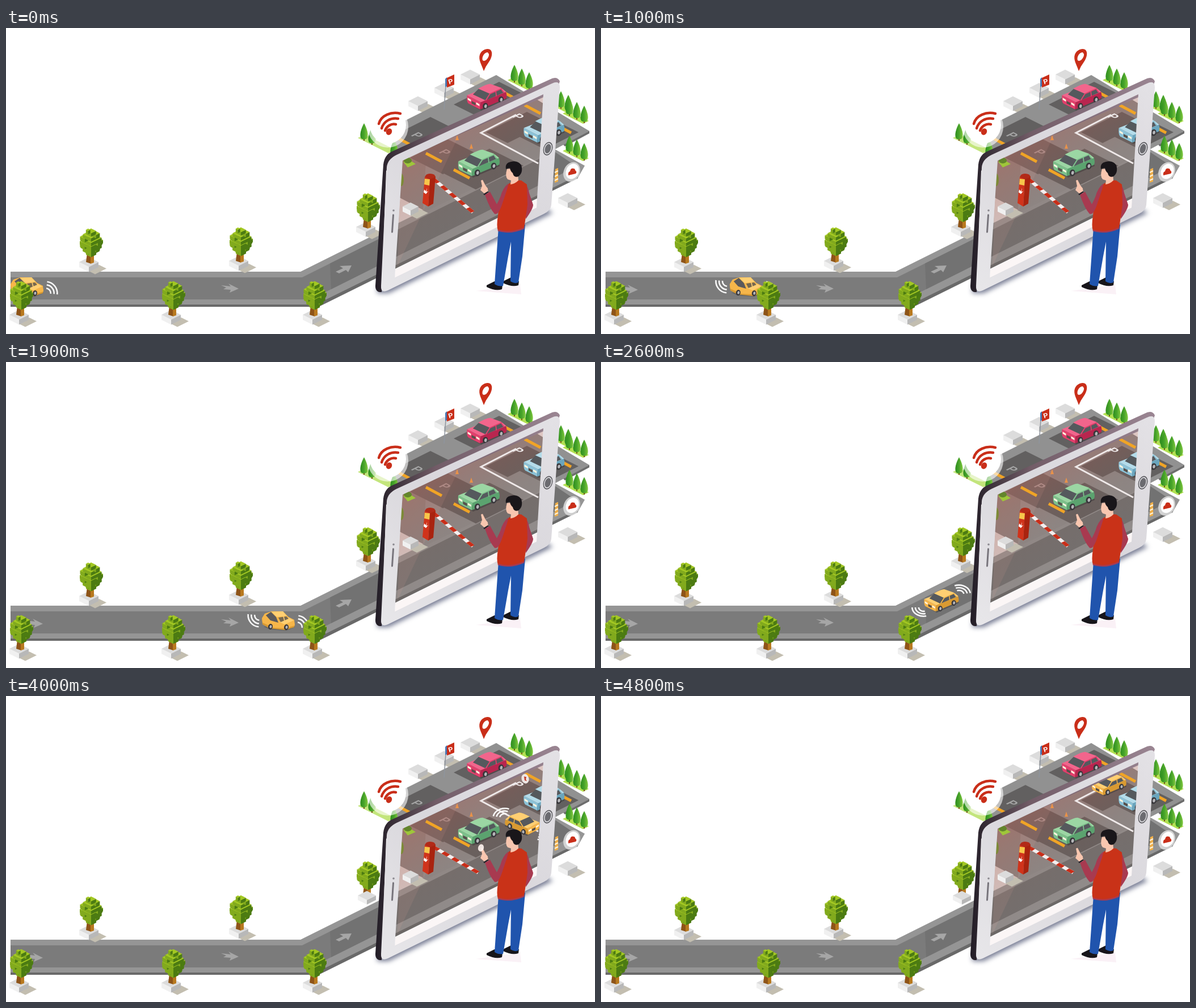
Write an HTML page with a canvas that moves like this. It is 1038 by 540 pixels and loops after 7.8 s.

```html
<!DOCTYPE html>
<html lang="en">
<head>
<meta charset="utf-8">
<title>Smart parking</title>
<style>
html, body { margin: 0; width: 100%; height: 100%; overflow: hidden; background: #fff; }
canvas { display: block; }
</style>
</head>
<body>
<canvas id="stage" width="1038" height="540"></canvas>
<script>
const c = document.getElementById('stage').getContext('2d');
const RED = '#c92e19';

// drawing helpers
const fill = (color, d, rule = 'nonzero') => { c.fillStyle = color; c.fill(new Path2D(d), rule); };
const line = (color, width, d) => { c.strokeStyle = color; c.lineWidth = width; c.stroke(new Path2D(d)); };
const oval = (color, x, y, rx, ry = rx, turn = 0) => {
  c.fillStyle = color;
  c.beginPath();
  c.ellipse(x, y, rx, ry, turn, 0, 7);
  c.fill();
};
const at = (x, y, draw, sx = 1, sy = sx, turn = 0) => {
  c.save();
  c.translate(x, y);
  c.rotate(turn);
  c.scale(sx, sy);
  draw();
  c.restore();
};
const blend = (x0, y0, x1, y1, ...colors) => {
  const g = c.createLinearGradient(x0, y0, x1, y1);
  colors.forEach((col, i) => g.addColorStop(i / (colors.length - 1), col));
  return g;
};
const letterP = (color, size) => {
  c.fillStyle = color;
  c.font = `bold ${size}px Arial, "Liberation Sans", sans-serif`;
  c.textAlign = 'center';
  c.fillText('P', 0, size * 0.37);
};

// isometric pieces: a flat tile from its left corner, a block from its top centre
const tile = (color, x, y, a, b) => fill(color, `M${x} ${y}l${a} ${-a / 2} ${b} ${b / 2} ${-a} ${a / 2}z`);
const block = (x, y, w, h, top, left, right) => {
  fill(left, `M${x - w} ${y}l${w} ${w / 2}v${h}l${-w} ${-w / 2}z`);
  fill(right, `M${x + w} ${y}l${-w} ${w / 2}v${h}l${w} ${-w / 2}z`);
  tile(top, x - w, y, w, w);
};
const stone = (x, y, w) => {
  tile('#c3beb0', x - 2, y + 15, 20, 13);
  block(x, y, w, 9, '#dcdcdc', '#f0f0f0', '#b8b8b8');
};

// straight legs between [step, a, b...] keys
function track(keys, s) {
  let i = 1;
  while (i < keys.length - 1 && keys[i][0] < s) i++;
  const [t0, ...a] = keys[i - 1], [t1, ...b] = keys[i];
  const k = Math.min(1, Math.max(0, (s - t0) / (t1 - t0)));
  return a.map((v, j) => v + (b[j] - v) * k);
}
const DRIVE = [
  [0, 37, 457], [8, 206, 457], [19, 480, 457], [20, 480, 457], [24, 544, 450],
  [38, 934, 255], [39, 930, 237], [44, 830, 186], [48, 895, 157]
];
const GATE = [[26, 0.7], [31, -0.09], [34, -0.09], [39, 0.52]];

// scenery
function road() {
  fill('#959595', 'M8 430H519L960 210 1020 243 1008 264 550 490H8Z');
  fill('#696969', 'M8 488H546L1006 261 1008 265 551 492H8Z');
  fill('#7b7b7b', 'M8 440H522L966 218 1002 242 980 257 537 479H8Z');
  fill('#727272', 'M571 415.500L966 218 1002 242 980 257 573 461Z');
  const arrow = 'M379 454L396 456 392 451 410 460 394 467 396 462 383 461 388 458Z';
  fill('#a6a6a6', arrow);
  at(-345, 2, () => fill('#a6a6a6', arrow));
  fill('#a6a6a6', 'M581 430L594 424 588 420 609 419 603 431 599 427 587 433Z');
}

function groundP(x, y, color) {
  c.save();
  c.transform(0.8, 0.42, -0.9, 0.45, x, y);
  letterP(color, 21);
  c.restore();
}

function lot() {
  fill('#6d6d6d', 'M864 86L1028 182V186L985 209Z');
  fill('#919191', 'M680 175L864 83 1028 182 960 218 735 326 690 290Z');
  fill('#858280', 'M690 225L740 235 735 322 690 344Z');
  fill('#e5dcda', 'M693 299L735 321 722 329 690 344Z');
  const bay = (...t) => tile('#626060', ...t);
  bay(682, 190, 66, 52);
  bay(789, 135, 80, 40);
  bay(712, 229, 66, 58);
  bay(768, 255, 84, 60);
  bay(846, 184, 72, 38);
  bay(905, 192, 60, 44);
  groundP(725, 189, '#a5a5a5');
  groundP(774, 219, '#a9a0a0');

  c.save();
  c.clip(new Path2D('M699 234L947 117 940 297 686 424Z'));
  c.fillStyle = blend(710, 210, 830, 400, 'rgba(176,80,68,.42)', 'rgba(130,95,85,.25)', 'rgba(120,100,95,.15)');
  c.fillRect(680, 110, 270, 330);
  fill('rgba(255,180,170,.09)', 'M698 225L800 185 690 420Z');
  c.restore();
  fill('#fbf6f6', 'M686 425L940 299 936 318 685 441Z');

  line('#efe9e9', 3, 'M899 153L837 185 938 239');
  groundP(903, 156, '#efeaea');
  for (const p of ['690 194', '740 221', '789 250', '874 112', '914 136', '968 170'])
    line('#f0a426', 5, `M${p}l28 15`);
  for (const i of [0, 1]) fill('#e8924a', `M${792 + 25 * i} ${198 + 15 * i}l3 -9 3 9z`);
}

function tree(x, y, bare) {
  at(x, y, () => {
    if (!bare) stone(0, 0, 17);
    fill('#8e5418', 'M-5 0L-2 -24H4V3Z');
    fill('#b8791f', 'M3 3V-24H9V1Z');
    if (bare) block(2, 1, 16, 8, '#dcdcdc', '#f0f0f0', '#b8b8b8');
    const leaf = (u, v, w) => block(4 + u, v, w, 6, '#a3c823', '#82aa1d', '#4c7b12');
    for (let i = 0; i < 7; i++) {
      const w = 20 * Math.sin(0.47 + 0.37 * i), v = -19 - 6 * i, side = i % 2 ? 1 : -1;
      leaf(0, v, w);
      leaf(side * w * 0.6, v - 2, w * 0.45);
    }
  });
}

function cypress(x, y) {
  at(x, y, () => {
    fill('#7a4a1c', 'M-1 -1H1V4H-1Z');
    fill(blend(-7, 0, 7, 0, '#2c8c1e', '#48a42a', '#86cb40'), 'M0 -27C-5 -18 -9 -6 -5 0Q0 3 5 0C9 -6 5 -18 0 -27Z');
  });
}

function grove(x, y) {
  tile('#b2e052', x - 12, y, 10, 36);
  for (let i = 0; i < 3; i++) cypress(x + 13 * i, y + 6.500 * i);
}

function wifiBubble() {
  tile('#c3e57c', 620, 194, 12, 54);
  cypress(631, 195);
  cypress(645, 202);
  cypress(684, 224);
  oval('rgba(255,255,255,.6)', 673, 174, 36, 37);
  oval('#fff', 673, 171, 32, 33);
  c.lineCap = 'round';
  line(RED, 4.500, 'M657 169C661 154 679 147 695 151M662 177C666 164 678 158 691 160M668 181C671 173 679 168 687 170');
  c.lineCap = 'butt';
  oval(RED, 675, 183, 5, 6, 0.5);
}

function signs() {
  line('#8f959d', 1.600, 'M772 144L776 88');
  fill('#4979b5', 'M774 90L777 87V103L774 104Z');
  fill(RED, 'M777 88L790 82V100L777 105Z');
  at(783.500, 94, () => letterP('#fff', 12), 1, 1, -0.3);
  fill(RED, 'M842 76C838 64 832 56 835 47C838 39 847 35 853 38C859 42 856 53 851 60Q845 68 842 76ZM849 43C843 43 838 51 840 57C845 61 852 51 851 46Z', 'evenodd');
}

function gate(angle) {
  stone(713, 315, 14);
  at(754, 267, () => {
    fill('#f4eeee', 'M0 -3H90V3H0Z');
    for (let x = 0; x < 90; x += 20) fill(RED, `M${x} -3h11l-3 6h-11z`);
  }, 1, 1, angle);
  fill('#a9230f', 'M744 315L753 310 757 262 747 266Z');
  fill('#d0331b', 'M734 309L738 263 747 266 744 315Z');
  fill('#b22a18', 'M738 263Q740 257 747 257Q756 257 757 263L747 267Z');
  fill('#f7c64b', 'M738 266L747 267 746 278 737 276Z');
  fill('#fff', 'M737 285L740 288 742 282 741 289 744 288 740 293 736 290Z');
}

function tablet() {
  fill(blend(650, 0, 972, 0, '#211c25', '#725c67', '#85707d', '#9a8592'),
    'M680 218L958 91Q971 84 976 94L970 112 690 236 670 252 662 466Q651 467 651 455L665 241Q667 224 680 218Z');
  fill(blend(660, 450, 970, 100, '#e7e6e9', '#d9d7dc', '#e3e1e5'),
    'M688 224L962 98Q976 91 976 105L961 312Q960 322 948 328L673 463Q660 469 661 455L671 246Q672 232 688 224Z' +
    'M699 234L947 117 935 317 685 441Z', 'evenodd');
  c.lineCap = 'round';
  line('#77747b', 3, 'M682.500 330L680.500 360');
  c.lineCap = 'butt';
  oval('#8a878e', 683, 322, 1.800);
  oval('#4e4e53', 955, 213, 8, 12, 0.3);
  oval('#d5d4d8', 955, 213, 6.800, 10.500, 0.3);
  oval('#6b6b70', 955, 213, 5, 8.500, 0.3);
}

function person() {
  fill('#faf1f6', 'M827 463L905 452 907 469Z');
  const shoe = () => fill('#17151a', 'M846 453L860 446 874 453 873 460Q862 464 846 456Z');
  shoe();
  at(29, -7, shoe);
  fill('#2054ad', 'M867 350L860 451Q868 456 875 454L884 402 889 376 888 446Q895 451 902 448L909 402 914 346Z');
  fill('#a83a50', 'M905 269Q918 272 921 290L928 311Q928 318 915 336L912 300Z');
  fill('#c93218', 'M882 276Q895 266 907 268L917 275 918 311 912 353Q888 364 866 357Q863 348 866 330L869 300Z');
  line('#a83a50', 2.500, 'M866 356Q888 363 912 352');
  fill('#a83a50', 'M885 273Q874 281 870 298L864 310 852 288 843 293Q851 317 860 327Q867 330 874 308L882 284Z');
  fill('#f8c6af', 'M843 292L835 285 838 278 836 268 839 267 844 277 848 282 849 290Z');
  line('#24212a', 2.500, 'M841 293L849 288');
  fill('#f8c6af', 'M882 248Q878 260 883 266L889 268 888 275Q896 274 902 268L901 255 895 247Z');
  fill('#19161a', 'M880 248Q878 237 889 235Q901 232 907 241Q911 254 902 261Q894 264 892 255Q888 252 887 246Q884 246 880 248Z');
}

// cars: light, middle and dark paint
const PAINT = {
  yellow: ['#ffcf72', '#f6b64a', '#d99a32'],
  pink: ['#f2658c', '#e23f6c', '#b8264f'],
  blue: ['#b4dcea', '#8cc3d8', '#6aa5bd'],
  green: ['#9bd6a3', '#7cc18b', '#5ba36f']
};

function waves(x, y, rx, ry, from, to) {
  c.strokeStyle = '#f7f7f7';
  c.lineWidth = 2.600;
  for (const k of [0.42, 0.7, 0.97]) {
    c.beginPath();
    c.ellipse(x, y, rx * k, ry * k, 0, from, to);
    c.stroke();
  }
}

function wheel(x, y) {
  oval('#37363a', x, y, 4, 5, 0.2);
  oval('#b5b5b8', x + 0.5, y, 2, 2.800, 0.2);
}

function sideCar() {
  const [top, mid, low] = PAINT.yellow;
  fill('rgba(50,50,50,.35)', 'M-26 10L-14 15 14 17 29 11 24 6Z');
  fill(low, 'M-29 -4L-28 6 -16 13 12 16 28 11 29 3Z');
  fill(mid, 'M-29 -5L-24 -13 -12 -17H8L18 -7 28 -2 29 8 12 13 -8 12 -28 3Z');
  fill(top, 'M-12 -16L8 -17 15 -9 -3 -7ZM2 2L18 -6 27 -1 11 6Z');
  fill('#5b5a5c', 'M-22 -10L-13 -16 -4 -7 0 3 -14 -1Z');
  fill('#77684f', 'M0 -6L14 -8 18 -4 4 2Z');
  line(top, 1.500, 'M9 -8L11 0');
  wheel(-14, 10);
  wheel(14, 11);
  waves(33, 11, 21, 21, -1.450, 0.1);
  waves(-33, -10, 21, 21, 1.650, 3.240);
}

function isoCar(paint, signal) {
  const [top, mid, low] = PAINT[paint];
  fill('rgba(45,45,45,.4)', 'M-29 8L-8 20 31 3 28 -5Z');
  fill(mid, 'M-30 -4Q-31 6 -28 9L-10 18 -9 7Z');
  fill(low, 'M-10 18L-9 6 29 -10Q32 -4 30 1Z');
  fill(top, 'M-30 -4L-9 7 30 -9 24 -14 9 -19Z');
  fill('#55595d', 'M-21 -5L-12 -14 5 -7 -2 4ZM-1 4L6 -6 22 -14 27 -8Z');
  fill(top, 'M-13 -14Q2 -22 6 -21L23 -15 5 -6Z');
  line(mid, 1.500, 'M23 -14L5 -6 -1 4M14 -10L15 -2M22 -14L26 -8');
  fill('#fff5df', 'M-29 0l5 3v3l-5 -3zM-16 7l5 3v3l-5 -3z');
  fill('#57504b', 'M-23 5l6 3v4l-6 -3z');
  wheel(-2, 13);
  wheel(22, 3);
  if (signal) {
    waves(31, -12, 21, 17, -1.950, -0.15);
    waves(-31, 11, 21, 16, 1.350, 3.150);
  }
}

function taxi(s) {
  const [x, y] = track(DRIVE, s);
  c.save();
  c.beginPath();
  c.rect(8, 0, 1030, 540);
  c.clip();
  if (s < 24) at(x, y, sideCar, 1, 1, -0.12 * Math.min(2, Math.max(0, s - 20)));
  else at(x, y, () => isoCar('yellow', s < 48), s >= 39 && s < 44 ? -1 : 1, 1);
  c.restore();
}

function marker(s) {
  if (s < 30 || s > 47) return;
  at(915, 146, () => {
    oval('#eee6e4', 0, 0, 6.500, 8.500, -0.25);
    fill('#c23a28', 'M-2 -4L2 -3 1 1 3 4 -1 3Z');
  }, 0.88 + 0.12 * Math.sin((s - 36) * 0.4));
}

function scene(s) {
  c.fillStyle = '#fff';
  c.fillRect(0, 0, 1038, 540);
  c.filter = 'blur(4px)';
  fill('rgba(75,82,112,.75)', 'M654 468L674 468 964 326 950 318 655 455Z');
  c.filter = 'none';

  road();
  for (let i = 0; i < 3; i++) stone(726 + 46 * i, 129 - 23.500 * i, 17);
  stone(990, 300, 17);
  lot();
  grove(896, 92);
  grove(965, 132);
  grove(993, 151);
  grove(993, 217);
  wifiBubble();
  signs();
  fill('#9fc63a', 'M700 236L708 231 722 240 708 246Z');
  oval('#63852c', 708, 234, 7, 5);
  oval('#7d8a37', 697, 268, 4, 11);
  tree(146, 413);
  tree(410, 411);
  tree(634, 351, s >= 32);

  marker(s);
  at(847, 123, () => isoCar('pink'), 1.150);
  taxi(s);
  at(948, 181, () => isoCar('blue'), 1.180);
  at(833, 240, () => isoCar('green'), 1.200);
  gate(track(GATE, s)[0]);
  tablet();

  for (const x of [23, 291, 540]) tree(x, 506);
  fill('#f0b04a', 'M968 249L973 247V271L967 273Z');
  for (let y = 255; y < 270; y += 7) line('#fff3dc', 2, `M967 ${y}l6 -3`);
  oval('rgba(222,222,222,.85)', 997, 254, 14, 18, 0.45);
  oval('#fff', 998, 253, 11, 14, 0.45);
  fill(RED, 'M991 260Q990 254 994 253Q995 247 1000 248Q1003 248 1003 251Q1007 254 1004 257Z');
  at(1, 1, person);
  if (s >= 39 && s <= 42) oval('rgba(255,244,240,.9)', 837, 268, 5, 6.500, 0.3);
}

let shown = -1;
function frame(now) {
  const s = Math.min(48, Math.floor(now % 7800 / 100));
  if (s !== shown) scene(shown = s);
  requestAnimationFrame(frame);
}
scene(0);
requestAnimationFrame(frame);
</script>
</body>
</html>
```
